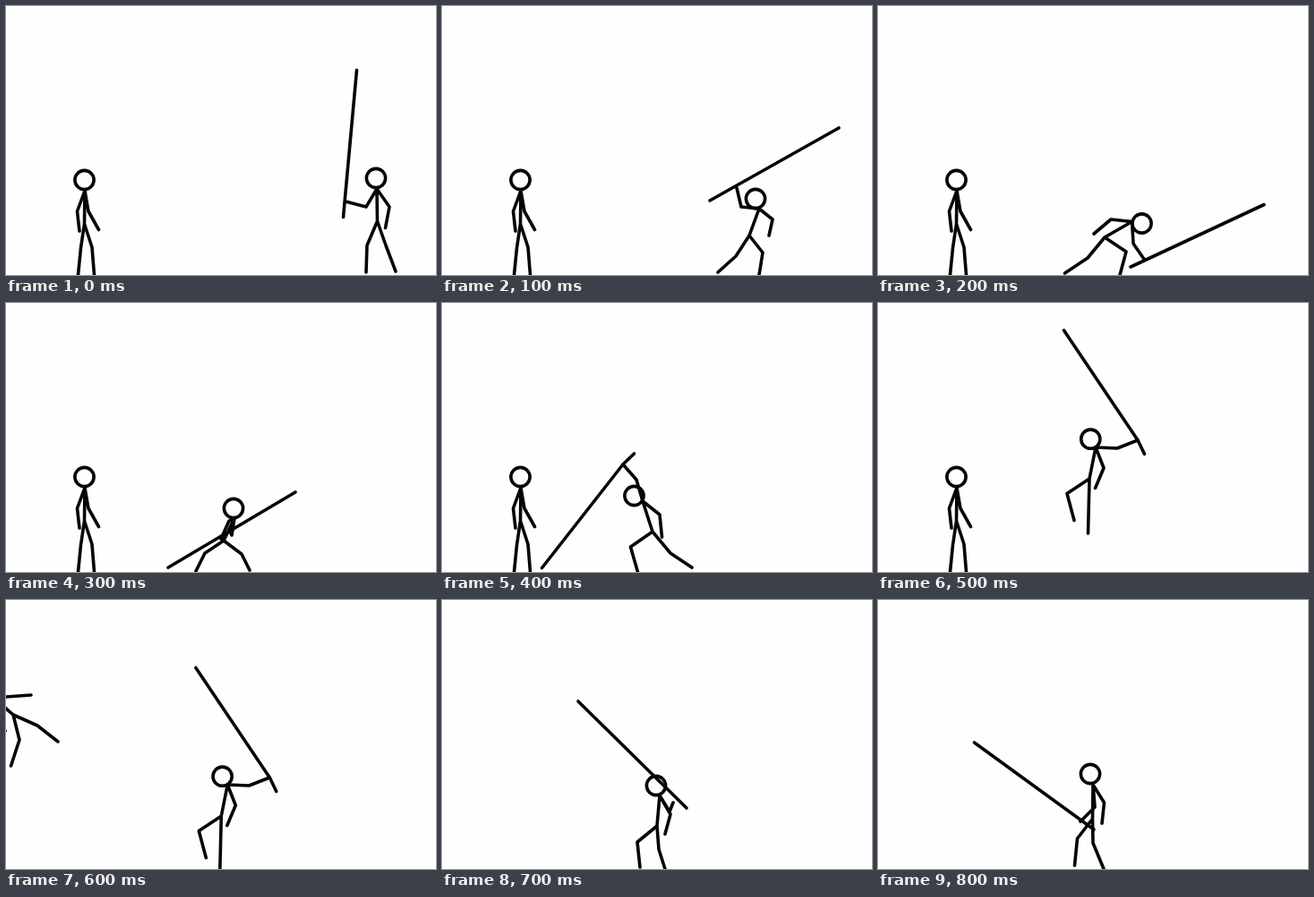
These frames come from a looping animation (480x300 px, 900 ms). An HTML page:

```html
<!DOCTYPE html>
<html lang="en">
<head>
<meta charset="utf-8">
<title>Pole fight</title>
<style>
  html, body { margin: 0; width: 100%; height: 100%; overflow: hidden; background: #fefefe; }
  svg { display: block; width: 100%; height: 100%; }
  path, circle { fill: none; stroke: #050505; stroke-width: 3.6; stroke-linecap: round; stroke-linejoin: round; }
  .pose { visibility: hidden; animation: pose 900ms step-end infinite; animation-delay: calc((var(--step) - 9) * 100ms); }
  .bystander { animation: bystander 900ms step-end infinite; }
  @keyframes pose { 0% { visibility: visible; } 11.1111% { visibility: hidden; } }
  @keyframes bystander { 0% { visibility: visible; } 66.6667% { visibility: hidden; } }
</style>
</head>
<body>
<svg viewBox="0 0 480 300">
  <g class="bystander">
    <circle cx="87.5" cy="194" r="10.6"/>
    <path d="M88 206L87.5 243M82 251L79.500 229L88 206L92 229L103.500 249.500M80.500 300L83.500 270L87.500 243L96 269L98.500 300"/>
  </g>

  <!-- Raise the pole, run in, plant it -->
  <g class="pose" style="--step:0">
    <circle cx="413" cy="192" r="10.6"/>
    <path d="M414 204L414.500 240M379 218L402 224L414 204L428 224L423.500 247.500M402 297L403 267L414.500 240L424 267L435 296"/>
    <path d="M391.500 71.500L376.500 235.500"/>
  </g>
  <g class="pose" style="--step:1">
    <circle cx="350" cy="215" r="10.6"/>
    <path d="M354 226L343 256M329 203L334 224L354 226L369 238L365 256M308 297L328 279L343 256L358 275L354 300"/>
    <path d="M299 217L443 136"/>
  </g>
  <g class="pose" style="--step:2">
    <circle cx="294.500" cy="242.500" r="10.6"/>
    <path d="M283.500 240.500L253 258M241 254L260 238L283.500 240.500L285 265L297.500 283M208.500 298L234 281L253 258L277 274L270 300"/>
    <path d="M282 291L431 221.500"/>
  </g>
  <g class="pose" style="--step:3">
    <circle cx="254" cy="229" r="10.6"/>
    <path d="M255 240L243 265M240 263L249 243L255 240L252 259L250 255M212 299L222 279L243 265L263 280L272 298"/>
    <path d="M181 295L323 211"/>
  </g>
  <g class="pose" style="--step:4">
    <circle cx="214.500" cy="215" r="10.6"/>
    <path d="M224 221L235 255M202 180L217 197L224 221L243 236L245.500 261M218.500 300L210.500 272L235 255L255 279L279 295"/>
    <path d="M111.500 295.500L202 180L214.500 168"/>
  </g>

  <!-- Vault, then drop in the same pose -->
  <g class="pose" style="--step:5">
    <g id="vaulter">
      <circle cx="237.300" cy="151.700" r="10.6"/>
      <path d="M243 161L236 196M290 153L267 162L243 161L252 184L242.500 206.500M219 242.500L211 212.500L236 196L234.500 257"/>
      <path d="M207.500 30.500L290 153L297.500 168.500"/>
    </g>
  </g>
  <g class="pose" style="--step:6">
    <use href="#vaulter" x="4.3" y="45"/>
    <path d="M-12 109L0 108L28 106M-8 114L8 128L35 140L58 158M8 128L15 156L5.500 185M-8 138L-1 146"/>
  </g>

  <!-- Land and lower the pole -->
  <g class="pose" style="--step:7">
    <circle cx="239" cy="207" r="10.6"/>
    <path d="M243 218L240 252M258 226L254 236L243 218L255 239L249 261M221 298L218 270L240 252L242 278L249 300"/>
    <path d="M152 113L273 232"/>
  </g>
  <g class="pose" style="--step:8">
    <circle cx="237" cy="194" r="10.6"/>
    <path d="M240 206L239.500 244M226 247L242 231L240 206L252.500 226L250 249M219.500 296L222.500 266L239.500 244L240 271L252 300"/>
    <path d="M107.500 159L241 256"/>
  </g>
</svg>
</body>
</html>
```
